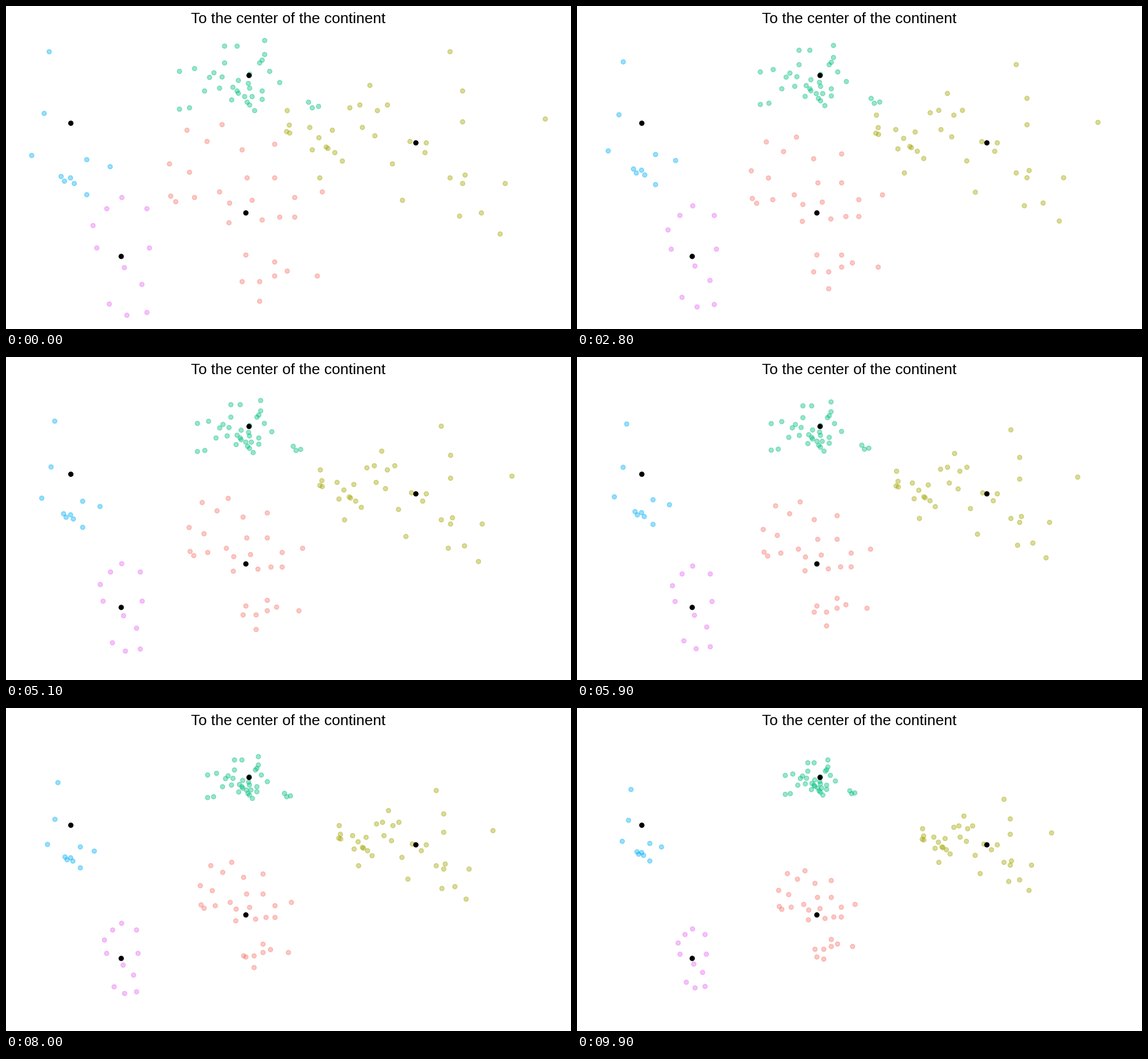
A matplotlib script for the animation above (10000 ms loop, 990x566 px).

```python
import numpy as np
import matplotlib.pyplot as plt
from matplotlib.animation import FuncAnimation
from matplotlib.colors import to_rgba

W, H, DPI = 990, 566, 144
FRAMES, INTERVAL = 100, 100
ALPHA = 0.4
SHIFT = 35  # degrees the Americas are pulled eastwards

# (longitude, latitude) of each country
AFRICA = [
    (9, 34), (-5, 32), (3, 28), (17, 25), (30, 27), (-12, 20), (-4, 17),
    (19, 15), (30, 15), (-11.5, 8.5), (-9.5, 6.5), (-2, 8), (8, 10),
    (12, 6), (21, 7), (38, 8), (49, 10), (11.75, -1), (25, 0), (32, 1),
    (38, 1), (18.5, -12.5), (30, -15), (35, -18.25), (30, -20), (47, -20),
    (17, -22), (24, -22), (24, -29),
]
ASIA = [
    (100, 60), (105, 46), (105, 35), (138, 36), (68, 48), (35, 39), (64, 41),
    (60, 40), (75, 41), (71, 39), (65, 33), (70, 30), (44, 33), (53, 32),
    (35.83, 33.83), (34.75, 31.5), (36, 31), (47.66, 29.34), (45, 25),
    (50.55, 26), (51.25, 25.5), (54, 24), (57, 21), (48, 15), (77, 20),
    (81, 7), (84, 28), (90.5, 27.5), (90, 24), (100, 15), (106, 16),
    (105, 13), (122, 13), (112.5, 2.5), (103.8, 1.37), (120, -5),
]
EUROPE = [
    (26, 64), (10, 62), (15, 62), (26, 59), (25, 57), (24, 56), (10, 56),
    (-2, 54), (-8, 53), (28, 53), (5.75, 52.5), (9, 51), (4, 50.83),
    (20, 52), (15.5, 49.75), (32, 49), (19.5, 48.67), (2, 46), (8, 47),
    (13.33, 47.33), (20, 47), (15, 46), (15.5, 45.17), (25, 46), (25, 43),
    (18, 44), (21, 44), (19, 42), (20, 41), (22, 39), (12.83, 42.83),
    (-8, 39.5), (-4, 40), (43.5, 42), (45, 40), (47.5, 40.5),
]
NORTH = [
    (-95, 60), (-97, 38), (-102, 23), (-90.25, 15.5), (-88.92, 13.83),
    (-86.5, 15), (-85, 13), (-80, 21.5), (-80, 9), (-70.67, 19),
]
SOUTH = [
    (-66, 8), (-72, 4), (-56, 4), (-77.5, -2), (-76, -10), (-55, -10),
    (-65, -17), (-58, -23), (-71, -30), (-64, -34), (-56, -33),
]
STATIC = {(18.5, -12.5), (90.5, 27.5)}  # countries that stay put

# countries, colour, centre in pixels, longitude shift
GROUPS = [
    (AFRICA, "#F8766D", (420.3, 362.6), 0),
    (ASIA, "#A3A500", (718.2, 239.8), 0),
    (EUROPE, "#00BF7D", (425.9, 121.7), 0),
    (NORTH, "#00B0F6", (113.6, 205.4), SHIFT),
    (SOUTH, "#E76BF3", (201.9, 438.8), SHIFT),
]


def project(lon, lat):
    return 339.1 + 4.39 * lon, 374.9 - 4.913 * lat


start, goal, colors = [], [], []
for countries, color, center, shift in GROUPS:
    for lon, lat in countries:
        p = project(lon + shift, lat)
        start.append(p)
        goal.append(p if (lon, lat) in STATIC else center)
        colors.append(to_rgba(color, ALPHA))
for _, _, center, _ in GROUPS:
    start.append(center)
    goal.append(center)
    colors.append(to_rgba("black"))
start, goal = np.array(start), np.array(goal)

fig = plt.figure(figsize=(W / DPI, H / DPI), dpi=DPI, facecolor="white")
ax = fig.add_axes([0, 0, 1, 1])
ax.set(xlim=(0, W), ylim=(H, 0))
ax.axis("off")
ax.text(W / 2, 30, "To the center of the continent", fontsize=13.2,
        family="Liberation Sans", ha="center", va="baseline", color="black")
dots = ax.scatter(start[:, 0], start[:, 1], s=3.907 ** 2, c=colors,
                  edgecolors=colors, linewidths=0.709)


def update(i):
    # every dot covers half the way to its centre
    t = 0.5 * i / (FRAMES - 1)
    dots.set_offsets(start + (goal - start) * t)
    return [dots]


anim = FuncAnimation(fig, update, frames=FRAMES, interval=INTERVAL,
                     repeat=True, repeat_delay=0)
plt.show()
```
